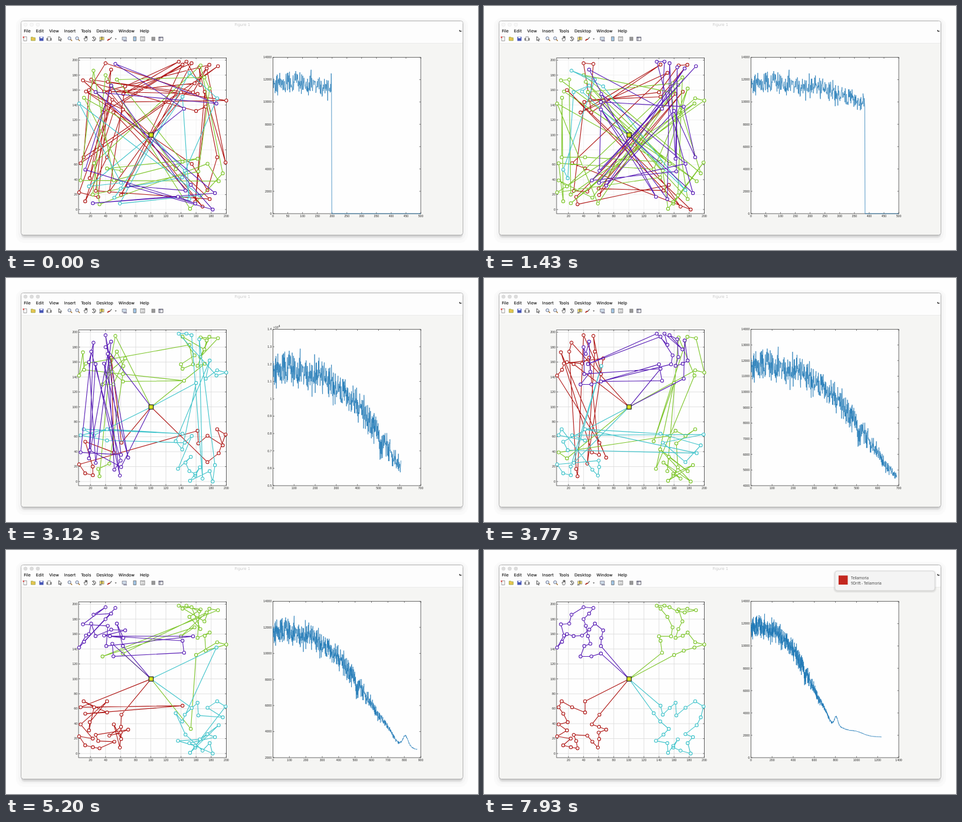
Animation of 800 by 416 pixels, one loop 8 s. Source, as an HTML page:

```html
<!DOCTYPE html>
<html lang="en">
<head>
<meta charset="utf-8">
<title>Route optimisation</title>
<style>
  html, body { margin: 0; width: 100%; height: 100%; overflow: hidden; background: #fefefe; }
  svg { display: block; width: 800px; height: 416px; }
  .menu { font: 6.9px "DejaVu Sans", sans-serif; fill: #111; stroke: #111; stroke-width: .12; }
  .title { font: 6.6px "DejaVu Sans", sans-serif; fill: #c9c9c9; }
  .tick { font: 5.1px "Liberation Sans", Arial, sans-serif; fill: #222; }
  .note { font: 6.2px "Open Sans", sans-serif; fill: #3c3c3c; }
</style>
</head>
<body>
<svg id="stage" viewBox="0 0 800 416"></svg>
<script>
const LOOP = 8000, STEP = 130, LAST = 61;
const COLORS = ['#b01a18', '#7fc62d', '#42c4cb', '#5a20b6'];
const stage = document.getElementById('stage');

function add(tag, attrs = {}, parent = stage, text) {
  const node = document.createElementNS('http://www.w3.org/2000/svg', tag);
  for (const name in attrs) node.setAttribute(name, attrs[name]);
  if (text !== undefined) node.textContent = text;
  parent.appendChild(node);
  return node;
}
const rect = (x, y, width, height, fill, more = {}, parent = stage) =>
  add('rect', { x, y, width, height, fill, ...more }, parent);
const line = (d, stroke, width = 1, parent = stage) =>
  add('path', { d, stroke, 'stroke-width': width, fill: 'none' }, parent);
const shape = (d, fill, stroke) => add('path', { d, fill, stroke, 'stroke-width': .7 });
const label = (x, y, text, cls, anchor = 'start', parent = stage) =>
  add('text', { x, y, class: cls, 'text-anchor': anchor }, parent, text);

function seeded(seed) {
  return () => {
    seed = (seed + 0x6D2B79F5) | 0;
    let t = Math.imul(seed ^ (seed >>> 15), 1 | seed);
    t ^= t + Math.imul(t ^ (t >>> 7), 61 | t);
    return ((t ^ (t >>> 14)) >>> 0) / 4294967296;
  };
}
const sigmoid = z => 1 / (1 + Math.exp(-z));

// Key cities of each corner as x, y pairs along its best tour.
const corners = [
  [63,144, 66,165, 55,174, 38,158, 18,160, 5,142, 14,158, 10,173, 21,174,
    24,186, 40,196, 53,195, 40,180, 43,171, 49,147, 41,144, 36,130, 63,134],
  [144,135, 142,151, 140,157, 156,157, 158,169, 142,194, 137,198, 154,196, 174,189,
    189,192, 166,193, 171,177, 162,155, 178,162, 188,149, 200,146, 187,142, 160,132],
  [133,54, 153,33, 136,17, 151,14, 152,1, 165,19, 159,8, 182,0, 178,14,
    185,22, 175,26, 190,38, 199,63, 188,70, 163,51, 162,68, 145,52, 142,64],
  [42,70, 42,55, 11,70, 7,62, 19,42, 7,39, 18,31, 5,23, 23,20,
    13,11, 32,7, 27,25, 45,24, 59,8, 60,28, 70,32, 51,39, 61,52]
];
const PER_CORNER = 25, COUNT = 4 * PER_CORNER;
const mapX = x => 117.6 + 1.2786 * x, mapY = y => 347 - 1.273 * y;
const cityNoise = seeded(3);

// The remaining cities lie near the middle of the longest legs.
function fillTour(flat) {
  const tour = [];
  for (let i = 0; i < flat.length; i += 2) tour.push([flat[i], flat[i + 1]]);
  const leg = i => Math.hypot(tour[i][0] - tour[i - 1][0], tour[i][1] - tour[i - 1][1]);
  while (tour.length < PER_CORNER) {
    let longest = 1;
    for (let i = 2; i < tour.length; i++) if (leg(i) > leg(longest)) longest = i;
    const [a, b] = [tour[longest - 1], tour[longest]];
    tour.splice(longest, 0, [0, 1].map(k => (a[k] + b[k]) / 2 + 4 * (cityNoise() - .5)));
  }
  return tour.map(([x, y]) => [mapX(x), mapY(y)]);
}
const cities = corners.flatMap(fillTour);

// Annealing: heat shifts runs of cities along the ideal order and moves the cuts between routes.
function routesAt(step) {
  const rnd = seeded(step * 31 + 7), noise = () => 2 * rnd() - 1;
  const heat = 60 * (1 - step / LAST) ** 2.2;
  const run = 1 + Math.floor(step / 8);
  const shifts = Array.from({ length: COUNT }, noise);
  const keyed = cities.map((city, i) => {
    let key = i + heat * shifts[Math.floor(i / run)] + Math.min(heat, 3) * noise();
    if (heat < 4) {
      const first = i - i % PER_CORNER;
      key = Math.min(first + PER_CORNER - .5, Math.max(first, key));
    }
    return { city, key: (key + COUNT) % COUNT };
  });
  const order = keyed.sort((a, b) => a.key - b.key).map(k => k.city);
  const cuts = [1, 2, 3].map(k => Math.round(PER_CORNER * k + heat / 2 * noise())).sort((a, b) => a - b);
  return [0, 1, 2, 3].map(k => order.slice(k ? cuts[k - 1] : 0, k < 3 ? cuts[k] : COUNT));
}

// Tour cost per iteration: a sigmoid fall with a few bumps and noise that dies away.
const bumps = [[512, -500, 7], [760, -350, 30], [805, 700, 15], [1000, 250, 60]];
const costNoise = seeded(42);
let drift = 0;
const cost = Array.from({ length: 1240 }, (_, i) => {
  const trend = 1800 + 10050 * sigmoid((560 - i) * .0078);
  const bump = bumps.reduce((sum, [at, height, width]) => sum + height * Math.exp(-(((i - at) / width) ** 2) / 2), 0);
  const spread = 15 + 780 * sigmoid((600 - i) / 75);
  const wobble = 1.25 * (costNoise() + costNoise() + costNoise() - 1.5);
  drift = .93 * drift + .25 * (costNoise() - .5);
  return trend + bump + spread * (wobble + drift);
});

// Window
rect(17, 20, 766, 384, '#fafafa', { rx: 14 });
rect(21, 23, 758, 376, '#f5f5f5', { rx: 10 });
for (let i = 6; i > 0; i--) rect(26, 380, 748, 10 + i, '#000', { rx: 5, opacity: .035 });
rect(25.5, 25.5, 749, 365, '#f5f5f3', { rx: 4, stroke: '#b0b0b0' });
rect(26, 26, 748, 37, '#fdfdfd', { rx: 3.5 });
line('M26 63.5H774', '#ececea');
const lights = [33, 43.5, 54].map(cx => add('circle', { cx, cy: 31.8, r: 3, 'stroke-width': .6 }));
label(387.5, 34, 'Figure 1', 'title');
let menuX = 30.3;
for (const text of ['File', 'Edit', 'View', 'Insert', 'Tools', 'Desktop', 'Window', 'Help']) {
  menuX += label(menuX, 45.4, text, 'menu').getComputedTextLength() + 9;
}
line('M768 41.5q2-1 2 2.5M768.5 43h4', '#222');

// Toolbar
const outlined = (x, y, w, h, fill, stroke) => rect(x, y, w, h, fill, { stroke, 'stroke-width': .7 });
outlined(30, 52.5, 5, 7, '#fff', '#777');
rect(28.5, 52, 2.5, 2.5, '#d9534f');
shape('M42.5 59V53h3l1 1h3v5z', '#e6c552', '#8d9c35');
rect(56.5, 52.5, 7, 7, '#4656b5');
rect(58, 52.5, 4, 2.5, '#e8e8f6');
outlined(69, 55, 8, 3.5, '#999', '#555');
outlined(71, 52.5, 4, 6.5, '#fff', '#777');
shape('M89.5 52v7l1.700-1.600 1.200 2.600 1-.5-1.200-2.500h2.300z', '#fff', '#111');
for (const cx of [107.5, 120.5]) {
  add('circle', { cx, cy: 55, r: 2.6, fill: '#dcecf7', stroke: '#557', 'stroke-width': .8 });
  line(`M${cx + 2} 57l2.500 2.500`, '#a0702c', 1.4);
}
shape('M132 55l2 1v-4h1.200v3-3.500h1.200v3.500-3h1.200v5l-1 2.500h-3z', '#fff', '#444');
line('M146 54a3.300 3.300 0 1 1 0 4M148 53.500l2 5', '#333');
outlined(159, 53, 7, 5, '#f2dc6a', '#777');
line('M162.500 52v6M158 59.500h4', '#333', .9);
line('M179 53l-3 4', '#555', 1.2);
line('M172 59q2-3 4-2', '#b3332b', 2);
shape('M184.5 55.500h3l-1.500 1.800z', '#333', 'none');
outlined(197, 53, 7, 5, '#cfdcea', '#667');
line('M199 59.500h6', '#557');
outlined(216, 52.5, 4.5, 7, '#a4c8e8', '#555');
outlined(228, 52.5, 7, 7, '#fff', '#555');
line('M229.500 54.500h4.500M229.500 57.500h4.500', '#555', .7);
outlined(247, 53, 5.5, 6, '#999', '#777');
outlined(259, 53, 7, 6, '#fff', '#223');
line('M259 54h7M261 53v6', '#446', .8);

// Map axes
const mapTicks = Array.from({ length: 11 }, (_, i) => i * 20);
rect(123, 88, 250.5, 266, '#fefefe');
const grid = line(mapTicks.map(v => `M123 ${mapY(v)}H373.500` + (v ? `M${mapX(v)} 88V354` : '')).join(''), '#eee', .8);
rect(123, 88.5, 250.5, 265.5, 'none', { stroke: '#444', 'stroke-width': .8 });
for (const v of mapTicks) {
  const x = mapX(v), y = mapY(v);
  line(`M123 ${y}h2.500M373.500 ${y}h-2.500` + (v ? `M${x} 354v-2.500M${x} 88v2.500` : ''), '#444', .7);
  label(121, y + 1.8, v, 'tick', 'end');
  if (v) label(x, 360.3, v, 'tick', 'middle');
}

const tours = COLORS.map(color => {
  const group = add('g', { stroke: color, 'stroke-width': 1.15, 'stroke-linejoin': 'round' });
  return { path: add('path', { fill: 'none' }, group), dots: add('path', { fill: '#fff' }, group) };
});
rect(242.2, 216.2, 7.4, 7.4, '#d3e01f', { stroke: '#222', 'stroke-width': 1.2 });

// Cost axes
const box = { x: 452.5, y: 87.5, w: 250.5, h: 266.5 };
rect(box.x, box.y, box.w, box.h, '#fefefe', { stroke: '#444', 'stroke-width': .8 });
const costTicks = add('g');
const costLine = line('', '#1f78b6', .75);
costLine.setAttribute('stroke-linejoin', 'round');

// Notification, cut off at the window's right side
const clip = add('clipPath', { id: 'screen' });
rect(0, 0, 774, 416, '#000', {}, clip);
const notice = add('g', {}, add('g', { 'clip-path': 'url(#screen)' }));
for (const s of [3, 2, 1]) rect(595 - s, 37 - s, 169 + 2 * s, 33 + 2 * s, '#000', { rx: 4 + s, opacity: .035 }, notice);
rect(595, 36, 169, 33, '#f4f4f4', { rx: 4, stroke: '#d2d2d2', 'stroke-width': .7 }, notice);
rect(601, 43.5, 15.5, 15.5, '#c3271f', {}, notice);
label(622, 50, 'Tellamoria', 'note', 'start', notice);
label(622, 58.8, '9Drift -  Tellamoria', 'note', 'start', notice);

function drawTours(step) {
  const palette = [3, 1, 2, 0];
  const turn = Math.round((LAST - step) / 10) % 2;
  routesAt(step).forEach((points, k) => {
    const { path, dots } = tours[palette[(k - turn + 4) % 4]];
    path.setAttribute('d', 'M245.900 219.900' + points.map(p => 'L' + p).join('') + 'Z');
    dots.setAttribute('d', points.map(([x, y]) =>
      `M${x - 2.6} ${y}a2.6 2.6 0 1 1 5.2 0a2.6 2.6 0 1 1 -5.2 0`).join(''));
  });
}

function drawCost(step) {
  const n = 198 + 17 * step, top = 14000;
  const filling = n <= 500;
  const xStep = n > 1000 ? 200 : filling ? 50 : 100;
  const xMax = Math.max(500, Math.ceil(n / xStep) * xStep);
  const values = cost.slice(0, n), least = filling ? 0 : Math.min(...values);
  const yStep = least >= 4000 ? 1000 : 2000;
  const low = Math.floor(least / yStep) * yStep;
  const powers = low >= 5000;
  const right = box.x + box.w, bottom = box.y + box.h;
  const px = i => box.x + box.w * i / xMax;
  const py = v => box.y + box.h * (top - v) / (top - low);

  costTicks.textContent = '';
  for (let i = 0; i <= xMax; i += xStep) {
    line(`M${px(i)} ${bottom}v-2.500M${px(i)} ${box.y}v2.500`, '#444', .7, costTicks);
    label(px(i), 360.3, i, 'tick', 'middle', costTicks);
  }
  for (let v = low; v <= top; v += yStep) {
    line(`M${box.x} ${py(v)}h2.500M${right} ${py(v)}h-2.500`, '#444', .7, costTicks);
    label(450.3, py(v) + 1.8, powers ? v / 10000 : v, 'tick', 'end', costTicks);
  }
  if (powers) {
    label(453, 86.3, '×10', 'tick', 'start', costTicks);
    label(461.8, 84.2, '4', 'tick', 'start', costTicks);
  }
  let d = 'M' + values.map((v, i) => `${px(i + 1).toFixed(2)} ${py(v).toFixed(2)}`).join('L');
  if (filling) d += `L${px(n + 1)} ${bottom}H${right}`;
  costLine.setAttribute('d', d);
}

function draw(step) {
  const settled = step >= 22;
  for (const light of lights) {
    light.setAttribute('fill', settled ? '#dcdcdc' : '#f7f7f7');
    light.setAttribute('stroke', settled ? '#d2d2d2' : '#e6e6e6');
  }
  grid.setAttribute('stroke', settled ? '#dadada' : '#eeeeee');
  drawTours(step);
  drawCost(step);
  const slide = Math.min(1, Math.max(0, (step - 57) / 2));
  notice.setAttribute('visibility', slide > 0 ? 'visible' : 'hidden');
  notice.setAttribute('transform', `translate(${180 * (1 - slide) ** 2} 0)`);
}

let shown = -1;
const start = performance.now();
function tick() {
  const time = (performance.now() - start) % LOOP;
  const step = Math.min(LAST, Math.floor(time / STEP));
  if (step !== shown) draw(shown = step);
  requestAnimationFrame(tick);
}
tick();
</script>
</body>
</html>
```
